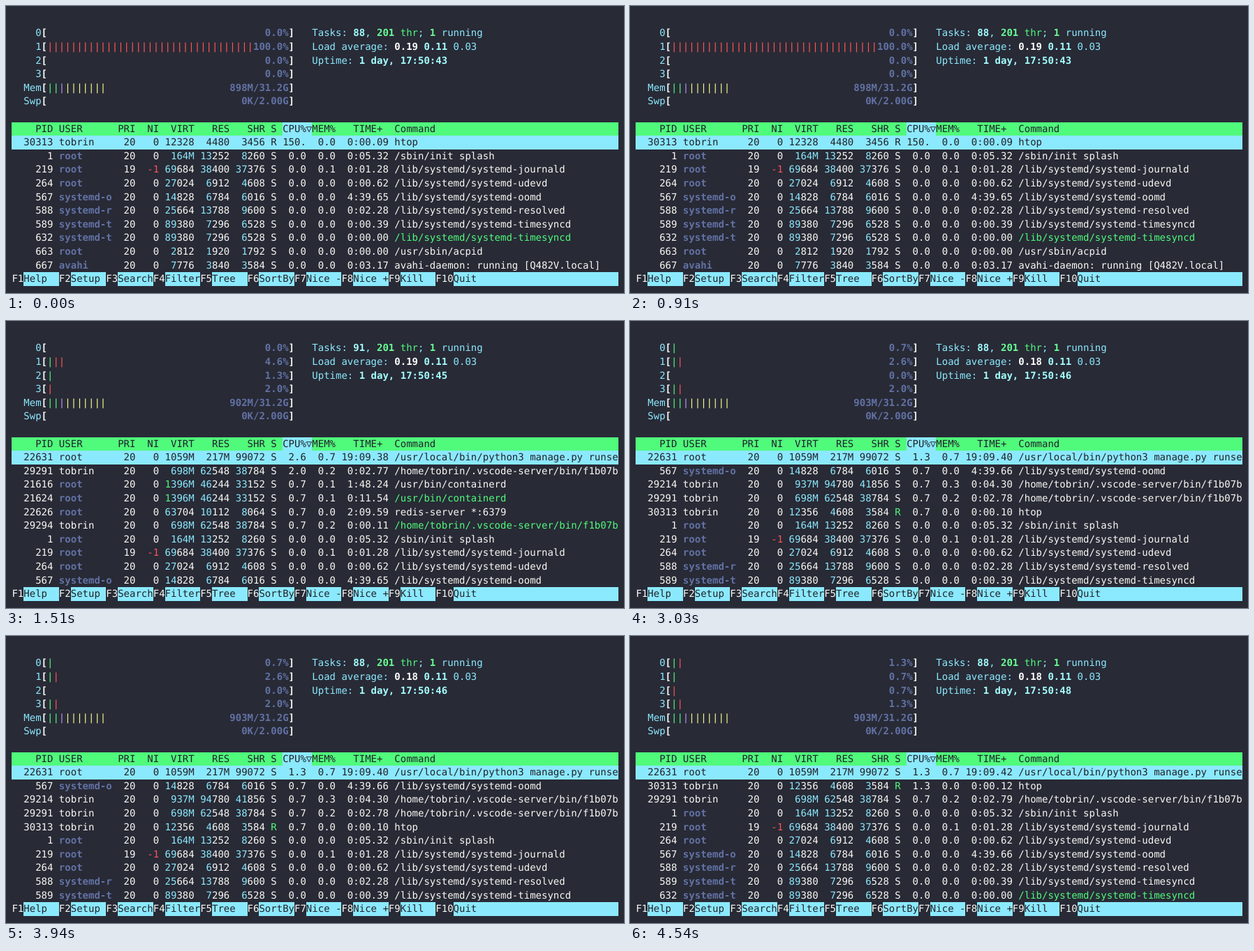
Recreate the animation shown at these times as an HTML page. Size 885 by 412 pixels, loop 6.01 s.

```html
<!DOCTYPE html>
<html lang="en">
<head>
<meta charset="utf-8">
<title>Process monitor</title>
<style>
  html, body { margin: 0; width: 100%; height: 100%; overflow: hidden; background: #282a36; }
  svg { display: block; }
  text { font: 14px "DejaVu Sans Mono", monospace; white-space: pre; text-rendering: geometricPrecision; }
  .b { font-weight: bold; }
  rect { shape-rendering: crispEdges; }
</style>
</head>
<body>
<svg id="term" width="885" height="412" viewBox="0 0 885 412"></svg>
<script>
const CELL = 885 / 105, LINE = 19.6, COLS = 103;
const BG = '#282a36', FG = '#f8f8f2', BLACK = '#21222c', RED = '#ff5555', GREEN = '#50fa7b',
  YELLOW = '#f1fa8c', PURPLE = '#bd93f9', CYAN = '#8be9fd', GRAY = '#6272a4',
  LIME = '#69ff94', AQUA = '#a4ffff', WHITE = '#ffffff';
const BAR = { r: RED, g: GREEN, p: PURPLE, y: YELLOW };

const term = document.getElementById('term');
let layer = term;

function add(tag, attrs, parent = layer) {
  const el = document.createElementNS('http://www.w3.org/2000/svg', tag);
  for (const k in attrs) el.setAttribute(k, attrs[k]);
  return parent.appendChild(el);
}
const left = col => (col + 1) * CELL;
const top_ = row => (row + 0.5) * LINE;

function fill(row, from, to, color) {
  const x = Math.round(left(from)), y = Math.round(top_(row));
  add('rect', { x, y, width: Math.round(left(to)) - x, height: Math.round(top_(row + 1)) - y, fill: color });
}

// Writes text on the character grid and returns the next column.
function put(row, col, str, color = FG, bold = false) {
  const chars = [...str];
  const el = add('text', {
    x: chars.map((_, i) => left(col + i).toFixed(2)).join(' '),
    y: (top_(row) + 14).toFixed(2), fill: color, class: bold ? 'b' : ''
  });
  el.textContent = str.replace(/ /g, '\u00a0');
  return col + chars.length;
}
const putEnd = (row, end, str, color, bold) => put(row, end - str.length, str, color, bold);

function meter(row, label, bars, value) {
  putEnd(row, 5, label, CYAN);
  put(row, 5, '[', FG, true);
  [...bars].forEach((c, i) => put(row, 6 + i, '|', BAR[c]));
  putEnd(row, 47, value, GRAY, true);
  put(row, 47, ']', FG, true);
}

function line(row, ...parts) {
  let col = 51;
  for (const [str, color, bold] of parts) col = put(row, col, str, color, bold);
}

function memory(row, end, str, selected) {
  if (selected) return putEnd(row, end, str, BLACK);
  const mega = str.endsWith('M');
  const cut = Math.max(0, str.length - (mega ? 4 : 3));
  const col = end - str.length;
  if (cut) put(row, col, str.slice(0, cut), mega ? GREEN : CYAN);
  put(row, col + cut, str.slice(cut), mega ? CYAN : FG);
}

// pid user virt res shr mem time command; a leading "~" marks a thread
const procs = {};
`1 root 164M 13252 8260 0.0 0:05.32 /sbin/init splash
219 root 69684 38400 37376 0.1 0:01.28 /lib/systemd/systemd-journald
264 root 27024 6912 4608 0.0 0:00.62 /lib/systemd/systemd-udevd
567 systemd-o 14828 6784 6016 0.0 4:39.65 /lib/systemd/systemd-oomd
588 systemd-r 25664 13788 9600 0.0 0:02.28 /lib/systemd/systemd-resolved
589 systemd-t 89380 7296 6528 0.0 0:00.39 /lib/systemd/systemd-timesyncd
632 systemd-t 89380 7296 6528 0.0 0:00.00 ~/lib/systemd/systemd-timesyncd
663 root 2812 1920 1792 0.0 0:00.00 /usr/sbin/acpid
667 avahi 7776 3840 3584 0.0 0:03.17 avahi-daemon: running [Q482V.local]
21616 root 1396M 46244 33152 0.1 1:48.24 /usr/bin/containerd
21624 root 1396M 46244 33152 0.1 0:11.54 ~/usr/bin/containerd
22626 root 63704 10112 8064 0.0 2:09.59 redis-server *:6379
22631 root 1059M 217M 99072 0.7 19:09.38 /usr/local/bin/python3 manage.py runse
29214 tobrin 937M 94780 41856 0.3 0:04.30 /home/tobrin/.vscode-server/bin/f1b07b
29291 tobrin 698M 62548 38784 0.2 0:02.77 /home/tobrin/.vscode-server/bin/f1b07b
29294 tobrin 698M 62548 38784 0.2 0:00.11 ~/home/tobrin/.vscode-server/bin/f1b07b
30313 tobrin 12356 4608 3584 0.0 0:00.10 htop`.split('\n').forEach(s => {
  const [pid, user, virt, res, shr, mem, time, ...cmd] = s.split(' ');
  procs[pid] = { user, virt, res, shr, mem, time, cmd: cmd.join(' ') };
});

// entry: pid [cpu [time [virt res shr]]]
function process(row, entry, selected) {
  const [pid, cpu = '0.0', ...now] = entry.split(' ');
  const p = procs[pid];
  const [time = p.time, virt = p.virt, res = p.res, shr = p.shr] = now;
  const ink = selected ? BLACK : FG;
  const nice = pid === '219' ? '-1' : '0';
  const state = pid === '30313' ? 'R' : 'S';
  const shadow = !selected && p.user !== 'tobrin';
  const thread = p.cmd[0] === '~';
  if (selected) fill(row, 0, COLS, CYAN);
  putEnd(row, 7, pid, ink);
  put(row, 8, p.user, shadow ? GRAY : ink, shadow);
  putEnd(row, 21, nice === '0' ? '20' : '19', ink);
  putEnd(row, 25, nice, nice === '0' ? ink : RED);
  memory(row, 31, virt, selected);
  memory(row, 37, res, selected);
  memory(row, 43, shr, selected);
  put(row, 44, state, state === 'R' && !selected ? GREEN : ink);
  putEnd(row, 50, cpu, ink);
  putEnd(row, 55, p.mem, ink);
  putEnd(row, 64, time, ink);
  put(row, 65, thread ? p.cmd.slice(1) : p.cmd, thread ? GREEN : ink);
}

const screens = [
  { end: 1510, cpu: [['', '0.0'], ['r'.repeat(35), '100.0'], ['', '0.0'], ['', '0.0']],
    mem: '898M', tasks: '88', load: '0.19', sec: '43',
    list: '30313 150. 0:00.09 12328 4480 3456,1,219,264,567,588,589,632,663,667' },
  { end: 3030, cpu: [['', '0.0'], ['grr', '4.6'], ['g', '1.3'], ['r', '2.0']],
    mem: '902M', tasks: '91', load: '0.19', sec: '45',
    list: '22631 2.6,29291 2.0,21616 0.7,21624 0.7,22626 0.7,29294 0.7,1,219,264,567' },
  { end: 4540, cpu: [['g', '0.7'], ['gr', '2.6'], ['', '0.0'], ['gr', '2.0']],
    mem: '903M', tasks: '88', load: '0.18', sec: '46',
    list: '22631 1.3 19:09.40,567 0.7 4:39.66,29214 0.7,29291 0.7 0:02.78,30313 0.7,1,219,264,588,589' },
  { end: 6010, cpu: [['gr', '1.3'], ['g', '0.7'], ['r', '0.7'], ['gr', '1.3']],
    mem: '903M', tasks: '88', load: '0.18', sec: '48',
    list: '22631 1.3 19:09.42,30313 1.3 0:00.12,29291 0.7 0:02.79,1,219,264,567 0.0 4:39.66,588,589,632' }
];

function drawFixed() {
  add('rect', { width: 885, height: 412, fill: BG });
  meter(6, 'Swp', '', '0K/2.00G');
  fill(8, 0, COLS, GREEN);
  fill(8, 46, 51, CYAN);
  put(8, 0, '    PID USER      PRI  NI  VIRT   RES   SHR S CPU%▽MEM%   TIME+  Command', BLACK);
  const keys = ['Help', 'Setup', 'Search', 'Filter', 'Tree', 'SortBy', 'Nice -', 'Nice +', 'Kill', 'Quit'];
  keys.forEach((name, i) => {
    const col = put(19, i * 8, 'F' + (i + 1));
    fill(19, col, i < 9 ? col + 6 : COLS, CYAN);
    put(19, col, name, BLACK);
  });
}

function drawScreen(s) {
  s.cpu.forEach(([bars, pct], i) => meter(1 + i, String(i), bars, pct + '%'));
  meter(5, 'Mem', 'ggpyyyyyyy', s.mem + '/31.2G');
  line(1, ['Tasks: ', CYAN], [s.tasks, AQUA, true], [', ', CYAN], ['201', LIME, true],
    [' thr', GREEN], ['; ', CYAN], ['1', LIME, true], [' running', CYAN]);
  line(2, ['Load average: ', CYAN], [s.load + ' ', WHITE, true], ['0.11 ', AQUA, true], ['0.03', CYAN]);
  line(3, ['Uptime: ', CYAN], ['1 day, 17:50:' + s.sec, AQUA, true]);
  s.list.split(',').forEach((entry, i) => process(9 + i, entry, i === 0));
}

drawFixed();
for (const s of screens) {
  layer = s.layer = add('g', { display: 'none' }, term);
  drawScreen(s);
}

const start = performance.now();
let shown;
function tick() {
  const t = (performance.now() - start) % 6010;
  const next = screens.find(s => t < s.end);
  if (next !== shown) {
    if (shown) shown.layer.setAttribute('display', 'none');
    next.layer.setAttribute('display', 'inline');
    shown = next;
  }
  requestAnimationFrame(tick);
}
tick();
</script>
</body>
</html>
```
